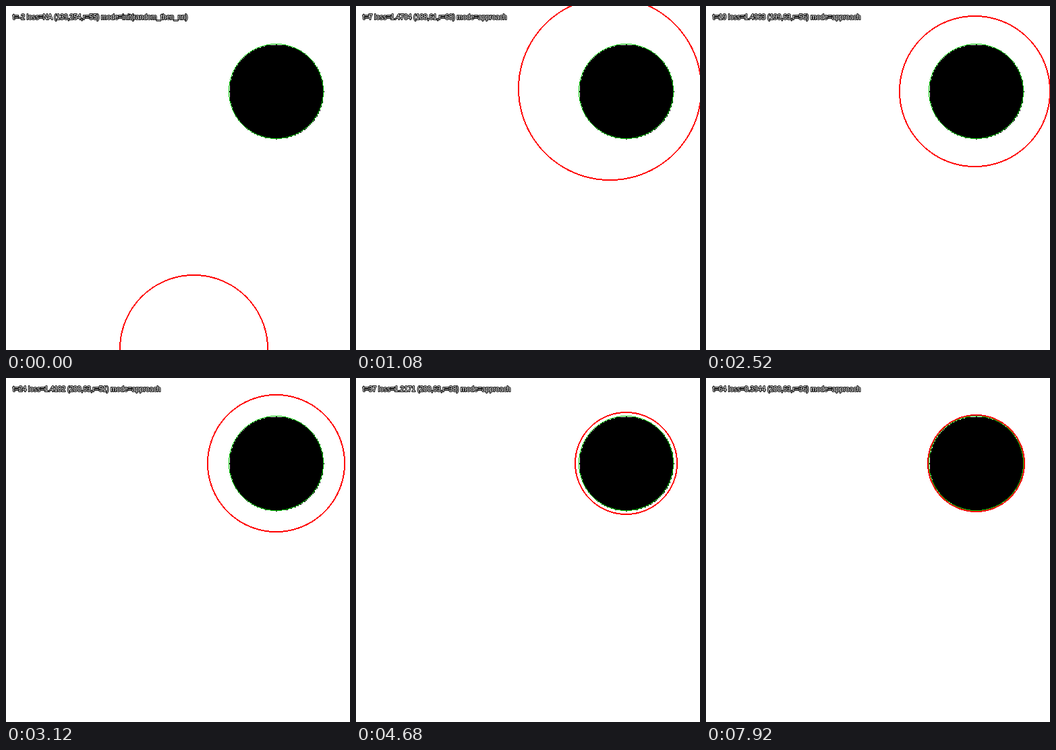
Animation of 510x510 px, one loop 8 s. Source, as an HTML page:

```html
<!DOCTYPE html>
<html lang="en">
<head>
<meta charset="utf-8">
<title>Circle fitting</title>
<style>
  html, body { margin: 0; width: 100%; height: 100%; overflow: hidden; background: #fff; }
  svg { display: block; width: 510px; height: 510px; }
  path { shape-rendering: crispEdges; }
  text {
    font: 10.2px "Liberation Sans", Arial, sans-serif;
    fill: #fff; stroke: #000; stroke-width: 2px; stroke-linejoin: round;
    paint-order: stroke; white-space: pre;
  }
</style>
</head>
<body>
<svg viewBox="0 0 510 510">
  <path id="disk"/>
  <path id="outline" fill="#00c800"/>
  <path id="guess" fill="#f00"/>
  <text id="label" x="10" y="20"></text>
</svg>
<script>
const LOOP = 8000, STEP = 120, SCALE = 2;
const TARGET = { x: 200, y: 63, r: 35 };
const LAST_MOVE = 39;

// Key values as [step, value], joined by straight lines.
const KEYS = {
  x: [[-2, 139], [3, 159], [5, 182], [12, 204], [19, 199], [21, 200]],
  y: [[-2, 254], [3, 83], [5, 61], [12, 61], [19, 63]],
  r: [[-2, 55], [3, 72], [LAST_MOVE, 36]],
  loss: [[0, 1.4312], [3, 1.3966], [12, 1.5626], [19, 1.4963], [29, 1.3401], [37, 1.2171], [38, 1.2017], [LAST_MOVE, 0.3944]]
};

const $ = id => document.getElementById(id);
const label = $("label");

function valueAt(keys, step) {
  const next = keys.findIndex(([s]) => s >= step);
  if (next < 0) return keys[keys.length - 1][1];
  if (next === 0) return keys[0][1];
  const [s0, v0] = keys[next - 1], [s1, v1] = keys[next];
  return v0 + (v1 - v0) * (step - s0) / (s1 - s0);
}

const strip = (x, y, width, height) => `M${x} ${y}h${width}v${height}h${-width}z`;

// Half the chord of a circle of radius r at distance y from its centre.
const halfChord = (r, y) => Math.sqrt(Math.max(0, r * r - y * y));

// A disk of 2 px blocks, one strip per row.
function diskPath({ x, y, r }) {
  let d = "";
  for (let row = -r; row <= r; row++) {
    const half = Math.floor(halfChord(r, row));
    d += strip((x - half) * SCALE, (y + row) * SCALE, (2 * half + 1) * SCALE, SCALE);
  }
  return d;
}

// A hard-edged ring on whole pixels, one strip per side and row.
function ringPath(circle, lineWidth) {
  const x = circle.x * SCALE, y = circle.y * SCALE, r = circle.r * SCALE;
  const innerR = r - lineWidth + 1;
  let d = "";
  for (let row = -r; row <= r; row++) {
    const h = Math.abs(row);
    const outer = Math.max(Math.round(halfChord(r, h)), Math.floor(halfChord(r, h - 0.5)));
    const inner = Math.min(Math.round(halfChord(innerR, h)), Math.ceil(halfChord(innerR, h + 0.5)));
    const width = outer - inner + 1;
    d += strip(x - outer, y + row, width, 1) + strip(x + inner, y + row, width, 1);
  }
  return d;
}

function modeAt(step) {
  if (step < 0) return "init(random_then_nn)";
  return step <= 3 ? "expand_nn" : "approach";
}

let shown = null;
function draw(now) {
  const step = Math.floor((now % LOOP) / STEP) - 2;
  if (step === shown) return;
  shown = step;
  const [x, y, r] = ["x", "y", "r"].map(key => Math.round(valueAt(KEYS[key], step)));
  const loss = step < 0 ? "NA" : valueAt(KEYS.loss, step).toFixed(4);
  $("guess").setAttribute("d", ringPath({ x, y, r }, 2));
  label.textContent = `t=${step} loss=${loss} (${x},${y},r=${r}) mode=${modeAt(step)}`;
}

$("disk").setAttribute("d", diskPath(TARGET));
$("outline").setAttribute("d", ringPath(TARGET, 1));
const start = performance.now();
function tick() {
  draw(performance.now() - start);
  requestAnimationFrame(tick);
}
tick();
</script>
</body>
</html>
```
